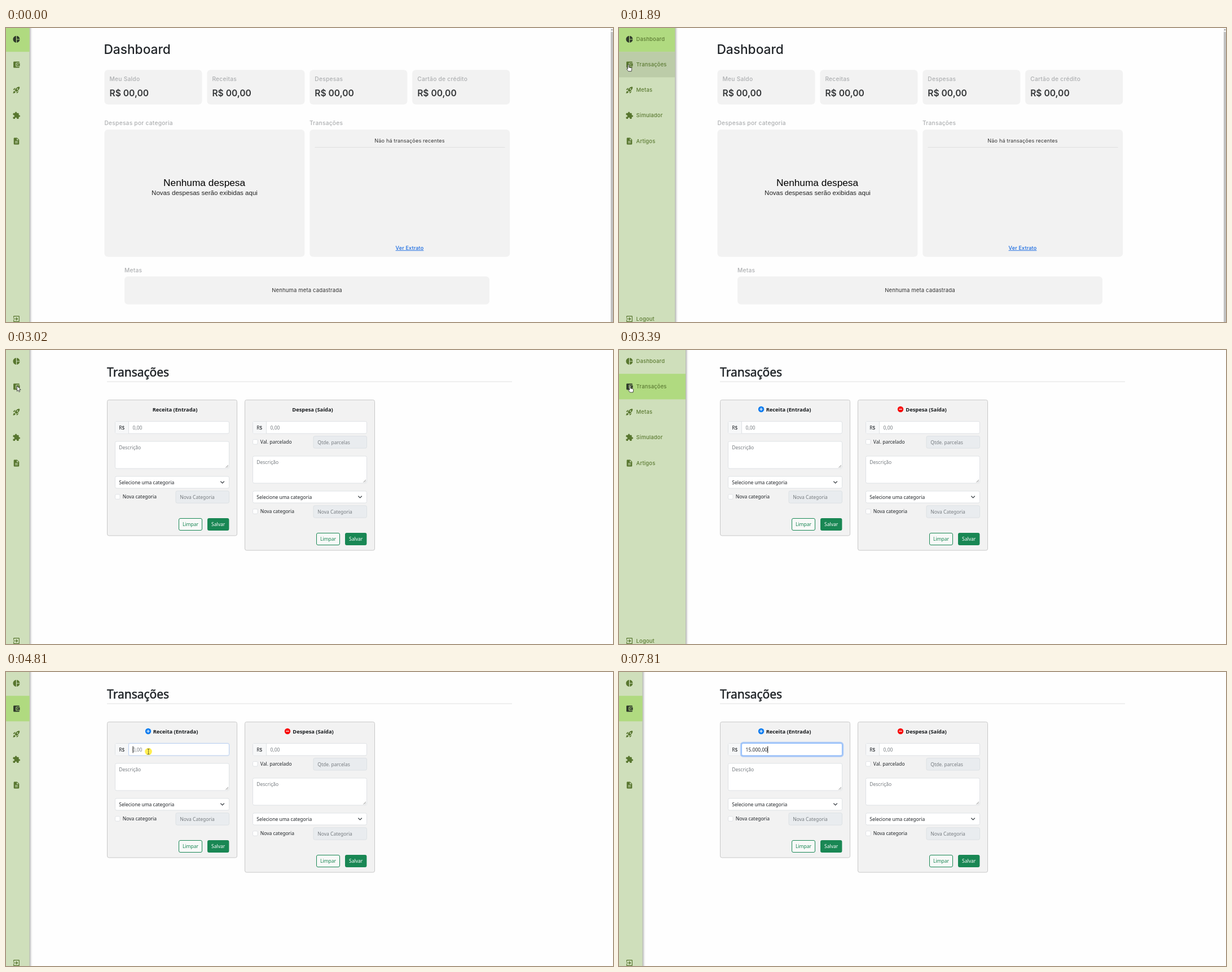
Animation of 1076 by 521 pixels, one loop 8000 ms. Source, as an HTML page:

```html
<!DOCTYPE html>
<html lang="pt-BR">
<head>
<meta charset="utf-8">
<title>Dashboard</title>
<style>
  html, body { margin: 0; width: 100%; height: 100%; overflow: hidden; background: #fefefe; }
  svg { display: block; width: 1076px; height: 521px; }
  text { white-space: pre; }
  .title { font: 500 22.7px Inter, sans-serif; fill: #212529; }
  .label { font: 500 10.2px Inter, sans-serif; letter-spacing: .025em; fill: #adafb1; }
  .money { font: 600 15.6px Inter, sans-serif; fill: #343638; }
  .note { font: 400 9.1px Inter, sans-serif; letter-spacing: .016em; fill: #333; }
  .link { font-weight: 500; fill: #1769e0; text-decoration: underline; }
  .big { font: 17.3px "Liberation Sans", Arial, sans-serif; fill: #000; }
  .sub { font: 11.54px "Liberation Sans", Arial, sans-serif; fill: #222; }
  .nav { font: 500 9.4px Inter, sans-serif; letter-spacing: .02em; fill: #5c7b33; }
  .heading { font: 400 21px "Noto Sans", sans-serif; fill: #212529; stroke: #212529; stroke-width: .55px; }
  .formTitle { font: 700 9.3px "Noto Sans", sans-serif; fill: #16191c; }
  .field { font: 400 8.5px "Noto Sans", sans-serif; fill: #212529; }
  .hint { fill: #777c80; }
  .mid { text-anchor: middle; }
  #bar { filter: drop-shadow(1px 0 2px rgba(0, 0, 0, .45)); }
</style>
</head>
<body>
<svg id="stage" viewBox="0 0 1076 521" xmlns="http://www.w3.org/2000/svg"></svg>
<script>
const LOOP = 8000, CLOSED = 41.6, OPEN = 118, ROW = 45.2;
const PANEL = '#f2f2f2', LINE = '#dfe2e5', GREEN = '#198754', NAV_GREEN = '#58762f', NAV_DARK = '#2f3a2a';

const rect = (x, y, w, h, r, fill, extra = '') =>
  `<rect x="${x}" y="${y}" width="${w}" height="${h}" rx="${r}" fill="${fill}" ${extra}/>`;
const text = (x, y, cls, s, extra = '') => `<text x="${x}" y="${y}" class="${cls}" ${extra}>${s}</text>`;
const path = (d, extra) => `<path d="${d}" ${extra}/>`;
const box = (x, y, w, h, fill = '#fff', stroke = LINE) => rect(x, y, w, h, 2.5, fill, `stroke="${stroke}"`);

function dashboard() {
  const cards = ['Meu Saldo', 'Receitas', 'Despesas', 'Cartão de crédito'].map((name, i) => {
    const x = 174.5 + i * 181.9;
    return rect(x, 74.3, 173, 61.2, 6, PANEL) + text(x + 9, 94, 'label', name) +
      text(x + 9, 120.5, 'money', 'R$ 00,00');
  }).join('');
  return text(173.5, 46, 'title', 'Dashboard') + cards +
    text(174.5, 172, 'label', 'Despesas por categoria') + text(538, 172, 'label', 'Transações') +
    rect(174.5, 180, 354.8, 225.6, 6, PANEL) + rect(538.3, 180, 354.8, 225.6, 6, PANEL) +
    text(351.6, 280, 'big mid', 'Nenhuma despesa') +
    text(352, 296.4, 'sub mid', 'Novas despesas serão exibidas aqui') +
    text(715.5, 203, 'note mid', 'Não há transações recentes') +
    rect(547.5, 211, 337, 1, 0, '#dfdfdf') +
    text(715.5, 392.8, 'note link mid', 'Ver Extrato') +
    text(210, 433, 'label', 'Metas') + rect(210, 440.2, 647, 49.6, 6, PANEL) +
    text(533.5, 468, 'note mid', 'Nenhuma meta cadastrada', 'style="font-size:9.5px"') +
    rect(1071.5, 0, 4.5, 521, 0, '#f1f1f1') + rect(1072, 7, 4, 514, 0, '#c1c1c1') +
    path('M1072.3 4l1.7-2 1.7 2z', 'fill="#777"');
}

// A checkbox with its label and the disabled field beside it
const option = (y, label, hint) =>
  rect(193.5, y + 6, 8.5, 8.5, 2, '#fff', `stroke="${LINE}"`) + text(206.8, y + 13.5, 'field', label) +
  box(301, y, 94.5, 21.4, '#e9ecef', '#dde1e4') + text(308.3, y + 14.2, 'field hint', hint);

function form(dx, extra, name, id, iconX, iconColor, sign) {
  const y = extra;
  return `<g transform="translate(${dx})">` +
    rect(179.5, 88.5, 230, 240.5 + extra, 3, PANEL, 'stroke="#c8c8c8"') +
    text(299.5, 109, 'formTitle mid', name, `id="${id}"`) +
    `<g class="badge"><circle cx="${iconX}" cy="105" r="5.2" fill="${iconColor}"/>` +
    path(sign, `transform="translate(${iconX} 105)" stroke="#fff" stroke-width="1.2"`) + '</g>' +
    box(193.5, 126.5, 202, 21.5) +
    path('M194 127h23.500v20.500H194z', 'fill="#f6f7f8"') + rect(217, 127, 1, 21, 0, LINE) +
    text(200.3, 140.7, 'field', 'R$') +
    (id === 'income' ? '' : text(224.6, 140.7, 'field hint', '0,00')) +
    (extra ? option(152.6, 'Val. parcelado', 'Qtde. parcelas') : '') +
    box(193.5, 162 + y, 202, 48) + text(200.3, 175.8 + y, 'field hint', 'Descrição') +
    path(`M389.5 ${208.5 + y}l4.5-4.5M392 ${208.5 + y}l2-2`, 'stroke="#777" stroke-width=".8"') +
    box(193.5, 224 + y, 202, 21) + text(200.3, 237.8 + y, 'field', 'Selecione uma categoria') +
    path(`M380.6 ${233 + y}l3 3 3-3`, 'fill="none" stroke="#343a40" stroke-width="1.1" stroke-linecap="round"') +
    option(249.8 + y, 'Nova categoria', 'Nova Categoria') +
    box(306.5, 298.5 + y, 41, 21, '#f8f9f8', GREEN) +
    text(327, 312.4 + y, 'field mid', 'Limpar', `style="fill:${GREEN}"`) +
    rect(357, 298 + y, 38.4, 22, 3, GREEN) +
    text(376.2, 312.4 + y, 'field mid', 'Salvar', 'style="fill:#fff"') + '</g>';
}

function transactions() {
  return text(179, 47, 'heading', 'Transações') + rect(179, 55.6, 718, 1, 0, '#e0e1e2') +
    form(0, 0, 'Receita (Entrada)', 'income', 252, '#0a7cf0', 'M-2.8 0h5.6M0-2.8v5.6') +
    form(244, 26, 'Despesa (Saída)', 'expense', 255, '#f80808', 'M-2.8 0h5.6') +
    `<g id="focus">${rect(216.2, 125.2, 180.6, 24.2, 4, 'none', 'id="ring" stroke="#0d6efd" stroke-opacity=".3" stroke-width="2.8"')}` +
    rect(217.5, 126.5, 178, 21.5, 2.5, '#fff', 'stroke="#86b7fe"') + '</g>' +
    text(224.6, 140.7, 'field', '', 'id="amount"') + rect(0, 131.5, 1, 12, 0, '#111', 'id="caret"');
}

const navItems = [
  ['Dashboard', 20, 'M11 2v20c-5-.5-9-4.8-9-10s4-9.500 9-10zm2 0v9h9c-.5-4.700-4.200-8.500-9-9zm0 11v9c4.800-.5 8.500-4.200 9-9z'],
  ['Transações', 65, 'M21 18v1a2 2 0 0 1-2 2H5a2 2 0 0 1-2-2V5a2 2 0 0 1 2-2h14a2 2 0 0 1 2 2v1h-9a2 2 0 0 0-2 2v8a2 2 0 0 0 2 2zm-9-2h10V8H12zm4-2.500a1.500 1.500 0 1 1 0-3 1.500 1.500 0 0 1 0 3z'],
  ['Metas', 110, 'M9.200 6.400Q7 9 5.600 12.200L2 10.700 6 6.700q.8-.8 1.900-.6zM11.200 17Q15 15.500 17 13.300C22.500 8 21.600 3.700 21.300 2.700 20.300 2.400 16 1.500 10.700 7Q8.500 9 7 12.800zM17.600 14.800Q15 17 11.800 18.400L13.300 22l4-4q.8-.8.6-1.900zM9 18q0 1.300-.9 2.100C7 21.300 2 22 2 22s.7-5 1.900-6.100A3 3 0 0 1 9 18zM13 9a2 2 0 1 1 4 0 2 2 0 0 1-4 0z'],
  ['Simulador', 155, 'M20.500 11H19V7a2 2 0 0 0-2-2h-4V3.500a2.500 2.500 0 0 0-5 0V5H4a2 2 0 0 0-2 2v3.800h1.500a2.700 2.700 0 0 1 0 5.400H2V20a2 2 0 0 0 2 2h3.800v-1.500a2.700 2.700 0 0 1 5.400 0V22H17a2 2 0 0 0 2-2v-4h1.500a2.500 2.500 0 0 0 0-5z'],
  ['Artigos', 200.5, 'M14 2H6a2 2 0 0 0-2 2v16a2 2 0 0 0 2 2h12a2 2 0 0 0 2-2V8zm2 16H8v-2h8zm0-4H8v-2h8zm-3-5V3.500L18.500 9z'],
  ['Logout', 515.5, 'M10 15.600l1.500 1.400 5-5-5-5L10 8.400l2.700 2.600H3v2h9.700zM19 3H5a2 2 0 0 0-2 2v4h2V5h14v14H5v-4H3v4a2 2 0 0 0 2 2h14a2 2 0 0 0 2-2V5a2 2 0 0 0-2-2z'],
];

function sidebar() {
  return rect(0, -5, CLOSED, 531, 0, '#cfdfbb', 'id="bar"') +
    `<clipPath id="barClip">${rect(0, 0, CLOSED, 521, 0, '#000', 'id="clip"')}</clipPath><g clip-path="url(#barClip)">` +
    rect(0, 0, OPEN, ROW, 0, '#b0da80', 'id="active"') + rect(0, 0, OPEN, ROW, 0, '#bccca8', 'id="hover"') +
    navItems.map(([, y, d]) => path(d, `class="icon" fill-rule="evenodd" transform="translate(11.3 ${y - 7.2}) scale(.6)"`)).join('') +
    `<g id="labels">${navItems.map(([name, y]) => text(30.6, y + 3, 'nav', name)).join('')}</g></g>`;
}

const pointer = '<g id="pointer"><circle id="press" r="6.3" fill="#ffec3d" fill-opacity=".9"/>' +
  path('M0 0V9.600L2.200 7.600 3.700 10.900 5.200 10.200 3.800 7H6.700Z', 'id="arrow" fill="#fff" stroke="#222" stroke-width=".8"') +
  path('M-1 1a1 1 0 0 1 2 0V4.500L5 5.400q1.200.3 1.100 1.600L5.500 11.500H0L-3 7.800q0-1.300 1-1l1 .8Z', 'id="hand" fill="#fff" stroke="#222" stroke-width=".8"') +
  path('M-2-4.500H2M0-4.500v9M-2 4.500H2', 'id="beam" stroke="#333" stroke-opacity=".75" stroke-width=".9"') + '</g>';

const $ = id => document.getElementById(id);
$('stage').innerHTML = rect(0, 0, 1076, 521, 0, '#fefefe') +
  `<g id="home">${dashboard()}</g><g id="entry">${transactions()}</g>` + sidebar() + pointer;
const icons = document.querySelectorAll('.icon'), badges = document.querySelectorAll('.badge');

const show = (el, on) => el.setAttribute('visibility', on ? 'inherit' : 'hidden');
const set = (id, name, value) => $(id).setAttribute(name, value);
const progress = (t, from, to) => Math.min(1, Math.max(0, (t - from) / (to - from)));
const smooth = p => p * p * (3 - 2 * p);
const ease = p => 1 - (1 - p) ** 2.4;
const between = (t, from, to) => t >= from && t < to;

// Pointer moves: start, end, destination
const start = [1034, 505];
const moves = [[520, 1270, 128, 296], [1340, 1900, 16.5, 65], [3019, 3020, 19.5, 63.5],
  [3640, 4090, 252.5, 141], [5150, 5350, 1056, 186]];
const typed = [[6210, '0,01'], [6340, '0,15'], [6610, '1,50'], [7010, '15,00'],
  [7210, '150,00'], [7410, '1.500,00'], [7810, '15.000,00']];

function pointerAt(t) {
  let [x, y] = start;
  for (const [from, to, tx, ty] of moves) {
    const p = smooth(progress(t, from, to));
    x += (tx - x) * p;
    y += (ty - y) * p;
  }
  return [x, y];
}

function barWidth(t) {
  const open = t < 3020 ? ease(progress(t, 1758, 2058))
    : ease(progress(t, 3090, 3390)) - ease(progress(t, 3830, 4130));
  return CLOSED + (OPEN - CLOSED) * open;
}

function drawSidebar(t, x, y) {
  const width = barWidth(t), active = t < 3020 ? 0 : t < 3090 ? -1 : 1;
  set('bar', 'width', width);
  set('clip', 'width', width);
  show($('labels'), width > CLOSED + 1);
  show($('active'), active >= 0);
  set('active', 'y', active * ROW - 3);
  const row = Math.floor((y + 3) / ROW);
  show($('hover'), t > 1340 && x < width && row < 5 && row !== active && active >= 0);
  set('hover', 'y', row * ROW - 3);
  const down = progress(t, 2460, 2630);
  set('hover', 'fill', `rgb(${188 - 9 * down},${204 - 9 * down},${168 - 9 * down})`);
  icons.forEach((icon, i) => icon.setAttribute('fill', i === active ? NAV_DARK : NAV_GREEN));
  return width;
}

function drawForms(t) {
  const loaded = t >= 3250;
  badges.forEach(badge => show(badge, loaded));
  set('income', 'x', loaded ? 300.5 : 299.5);
  set('expense', 'x', loaded ? 300.5 : 299.5);
  show($('focus'), t >= 4810);
  set('focus', 'opacity', progress(t, 4700, 4950));
  set('ring', 'opacity', progress(t, 4795, 4950));
  const entry = typed.filter(([from]) => t >= from).pop();
  $('amount').textContent = entry ? entry[1] : '0,00';
  $('amount').classList.toggle('hint', !entry);
  show($('caret'), between(t, 4810, 5350) || t >= 5880);
  set('caret', 'x', 224.6 + (entry ? $('amount').getComputedTextLength() : 0));
}

function draw(t) {
  const [x, y] = pointerAt(t);
  show($('home'), t < 3020);
  show($('entry'), t >= 3020);
  const width = drawSidebar(t, x, y);
  if (t >= 3020) drawForms(t);

  show($('pointer'), between(t, 520, 5350));
  set('pointer', 'transform', `translate(${x} ${y})`);
  const kind = x < width && !between(t, 3020, 3090) ? 'hand'
    : t > 3640 && between(x, 218, 396) && between(y, 126, 149) ? 'beam' : 'arrow';
  for (const id of ['arrow', 'hand', 'beam']) show($(id), id === kind);
  show($('press'), between(t, 2490, 2630) || between(t, 4810, 4950));
}

const began = performance.now();
function tick() {
  draw((performance.now() - began) % LOOP);
  requestAnimationFrame(tick);
}
tick();
</script>
</body>
</html>
```
